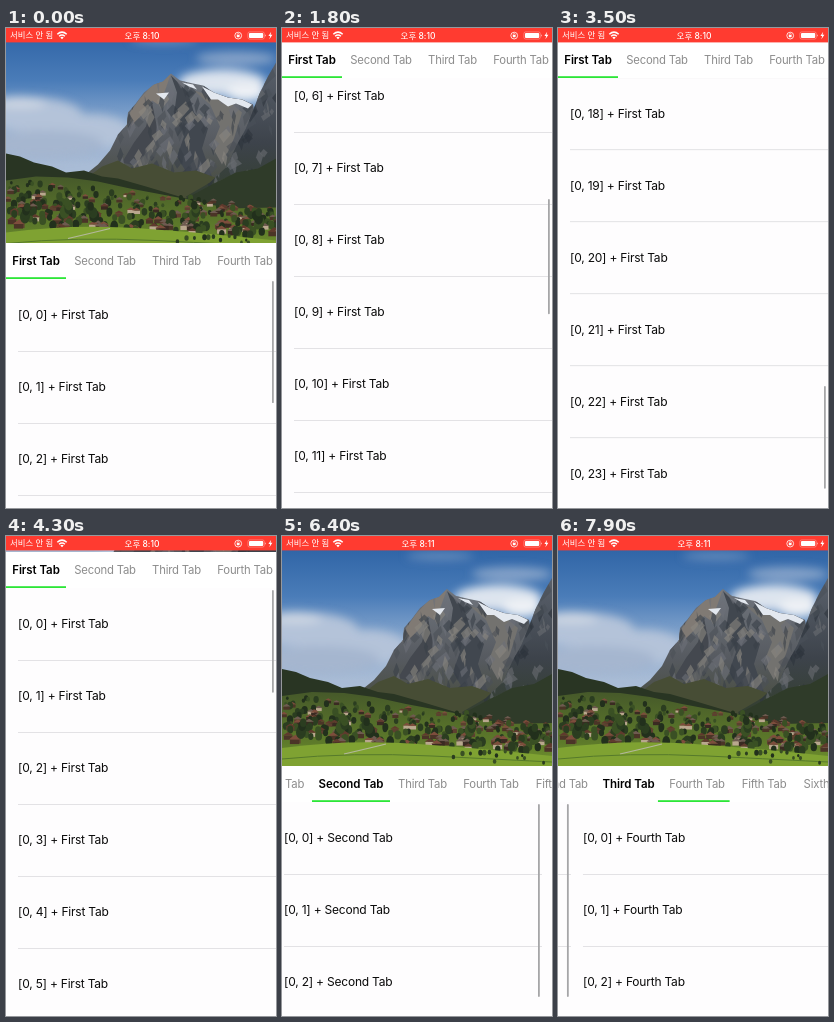
An HTML page for the animation above (8 s loop, 270 by 480 pixels).

```html
<!DOCTYPE html>
<html lang="ko">
<head>
<meta charset="utf-8">
<title>Sticky tabs</title>
<style>
html, body { margin: 0; width: 100%; height: 100%; overflow: hidden; background: #fff; }
svg { display: block; width: 270px; height: 480px; }
text { font-family: Inter, "Noto Sans CJK KR", "Noto Sans CJK", sans-serif; }
.row { font-size: 12px; letter-spacing: -.21px; fill: #0a0a0a; }
.tab { font-size: 11.3px; letter-spacing: -.2px; fill: #8c8c8c; text-anchor: middle; }
.tab.on { font-size: 11.5px; letter-spacing: -.07px; font-weight: 600; fill: #000; }
.status { fill: #fff; }
</style>
</head>
<body>
<svg viewBox="0 0 270 480">
  <defs>
    <linearGradient id="sky" x1="0" y1="0" x2="0" y2="1">
      <stop offset=".05" stop-color="#2f64a6"/>
      <stop offset=".25" stop-color="#4a7cb8"/>
      <stop offset=".42" stop-color="#86a6cd"/>
      <stop offset=".6" stop-color="#a9bcd6"/>
    </linearGradient>
    <linearGradient id="rock" x1="0" y1="0" x2="0" y2="1">
      <stop offset="0" stop-color="#70757d"/>
      <stop offset=".55" stop-color="#565a60"/>
      <stop offset="1" stop-color="#454a38"/>
    </linearGradient>
    <linearGradient id="slope" x1="0" y1="0" x2="0" y2="1">
      <stop offset="0" stop-color="#5a616c"/>
      <stop offset=".55" stop-color="#3d434b"/>
      <stop offset="1" stop-color="#323e2a"/>
    </linearGradient>
    <linearGradient id="grass" x1="0" y1="0" x2="0" y2="1">
      <stop offset="0" stop-color="#46592a"/>
      <stop offset=".6" stop-color="#5d7a2a"/>
      <stop offset="1" stop-color="#7b9e30"/>
    </linearGradient>
    <filter id="soft" x="-30%" y="-60%" width="160%" height="220%">
      <feGaussianBlur stdDeviation="5"/>
    </filter>
    <path id="peak" d="M72 160L92 144 104 130 112 114 121 104 122 92 129 84 138 72 148 64 157 61 165 53 174 60 187 63 197 65 208 72 222 77 236 79 247 84 262 180 72 180Z"/>
    <path id="cliff" d="M270 42L262 56 254 72 247 90 240 108 230 126 221 146 204 162 180 176 186 188 270 188Z"/>
    <clipPath id="peakClip"><use href="#peak"/></clipPath>
    <clipPath id="cliffClip"><use href="#cliff"/></clipPath>
    <clipPath id="window"><rect id="pane" y="14" width="270" height="216"/></clipPath>
  </defs>

  <rect width="270" height="480" fill="#fefdfe"/>
  <g id="pages"></g>

  <g clip-path="url(#window)">
    <g id="photo">
      <rect width="270" height="240" fill="url(#sky)"/>
      <g filter="url(#soft)" fill="#b4c3d9">
        <ellipse cx="24" cy="94" rx="52" ry="17"/>
        <ellipse cx="84" cy="112" rx="42" ry="18"/>
        <ellipse cx="36" cy="124" rx="62" ry="14" fill="#a5b6cf"/>
        <ellipse cx="14" cy="82" rx="26" ry="6" fill="#ccd5e2"/>
        <ellipse cx="158" cy="20" rx="34" ry="4" opacity=".4"/>
        <ellipse cx="216" cy="62" rx="44" ry="13" fill="#dde4ee"/>
        <ellipse cx="240" cy="72" rx="20" ry="9" fill="#eef1f5"/>
        <ellipse cx="230" cy="38" rx="40" ry="7" opacity=".6"/>
      </g>
      <use href="#peak" fill="url(#rock)"/>
      <g clip-path="url(#peakClip)">
        <path fill="#807a74" d="M165 53L157 60 146 65 134 78 124 92 125 106 138 92 146 80 152 84 159 70Z"/>
        <path fill="#41474f" d="M165 55L171 72 168 94 178 116 171 136 184 158 206 156 196 128 202 108 188 92 182 72Z"/>
        <path fill="#44484f" d="M146 82L140 106 128 122 116 142 132 146 144 124 152 112Z"/>
        <path fill="#73726f" d="M188 70L204 84 214 106 206 126 216 144 228 118 236 92 222 80Z"/>
        <g id="peakGrain"></g>
        <path fill="#e3e8ef" d="M196 66L208 72 222 77 236 79 246 84 242 88 230 83 222 86 212 79 205 79ZM176 62L187 64 191 69 183 66ZM150 73L163 72 158 79Z"/>
        <path fill="#474d35" d="M72 164L96 146 112 140 126 148 146 143 168 152 190 150 212 158 206 182 72 182Z"/>
      </g>
      <use href="#cliff" fill="url(#slope)"/>
      <g id="cliffGrain" clip-path="url(#cliffClip)"></g>
      <path fill="#2f3b29" d="M180 178L208 163 230 152 252 148 270 138V192H180Z"/>
      <path fill="#293523" d="M0 133L14 136 28 142 46 146 60 152 78 150 96 156 112 158 140 166 180 178 188 190 0 190Z"/>
      <path fill="url(#grass)" d="M0 160L30 156 62 157 92 161 124 168 156 174 188 180 222 188 270 187V240H0Z"/>
      <g id="village"></g>
      <path fill="#7fa232" d="M0 212Q60 204 118 207T270 220V240H0Z"/>
      <path fill="none" stroke="#b4b89c" stroke-width="1.2" d="M62 218Q88 212 104 208"/>
      <path fill="none" stroke="#567a2b" d="M0 223Q70 216 150 220T270 226"/>
      <g id="front"></g>
    </g>
  </g>

  <g id="bar">
    <rect width="270" height="36" fill="#fff"/>
    <g id="tabs"><rect id="mark" y="34.2" height="1.8" fill="#2ce637"/></g>
  </g>

  <g class="status">
    <rect width="270" height="14.4" fill="#ff3b30"/>
    <text x="4" y="10.4" font-size="8.4">서비스 안 됨</text>
    <g fill="none" stroke="#fff" stroke-width="1.5">
      <path d="M51.3 6.2Q56 2 60.7 6.2M53.1 8.2Q56 5.7 58.9 8.2"/>
    </g>
    <path d="M54.3 9.4Q56 8 57.7 9.4L56 11.2Z"/>
    <text id="clock" x="136" y="10.5" font-size="8.5" font-weight="500" text-anchor="middle"></text>
    <circle cx="232.2" cy="7.6" r="3.4" fill="none" stroke="#fff" stroke-width=".8"/>
    <rect x="230.8" y="7" width="2.8" height="2.2" rx=".4"/>
    <path fill="none" stroke="#fff" stroke-width=".6" d="M231.3 7.2V6.4a.9 .9 0 0 1 1.8 0V7.2"/>
    <rect x="241.9" y="3.9" width="16.4" height="7.2" rx="1.8" fill="none" stroke="#fff" stroke-width=".5" opacity=".6"/>
    <rect x="243" y="5" width="14.2" height="5" rx=".9"/>
    <path d="M259.1 6.2Q260.4 7.5 259.1 8.8Z"/>
    <path d="M265.2 3.8L262.4 8H264.2L263.4 11.2 266.4 6.8H264.5Z"/>
  </g>
</svg>
<script>
const LOOP = 8000, STEP = 100;
const ROW = 72, ROWS = 25, VIEW = 430, HEAD = 216, TOP = 14, TAB = 36;
const names = ["First", "Second", "Third", "Fourth", "Fifth", "Sixth"];
const edges = [0, 60, 138, 203, 275, 337, 402];

// [time, value] pairs: header collapse, list offset, page position
const collapse = [[0, 15], [200, 70], [500, 170], [700, 216], [4250, 216],
  [4300, 214], [4400, 90], [4500, 0]];
const listing = [[800, 0], [1100, 110], [1400, 330], [1900, 480], [2200, 640],
  [2700, 943], [3100, 1340], [3400, 1370], [3700, 1150], [4250, 0],
  [4450, 0], [4550, -15], [4700, -12], [5000, -1], [5200, 0]];
const paging = [[5300, 0], [5500, .35], [5700, .85], [5900, .98], [6000, 1],
  [6300, 1], [6400, 1.037], [6600, 1.25], [6900, 1.75], [7200, 1.97],
  [7500, 2], [7600, 2], [7700, 2.2], [7800, 2.7], [7900, 2.952]];

const $ = id => document.getElementById(id);
const mix = (a, b, k) => a + (b - a) * k;

function track(keys, t) {
  const i = keys.findIndex(k => k[0] > t);
  if (i < 0) return keys[keys.length - 1][1];
  if (i === 0) return keys[0][1];
  const [t0, a] = keys[i - 1], [t1, b] = keys[i];
  return mix(a, b, (t - t0) / (t1 - t0));
}

function add(parent, tag, attrs, text) {
  const node = document.createElementNS("http://www.w3.org/2000/svg", tag);
  set(node, attrs);
  if (text) node.textContent = text;
  return parent.appendChild(node);
}

function set(node, attrs) {
  for (const k in attrs) node.setAttribute(k, attrs[k]);
}

const move = (node, x, y) => set(node, { transform: `translate(${x} ${y})` });

let seed = 11;
function rnd(a, b) {
  seed = (seed * 16807) % 2147483647;
  return mix(a, b, seed / 2147483647);
}
const pick = list => list[Math.floor(rnd(0, list.length))];

// slanted slivers of light and shade on the rock
function grain(parent, x0, x1, y0, y1, lean, count, tones) {
  for (let i = 0; i < count; i++) {
    const x = rnd(x0, x1), y = rnd(y0, y1), h = rnd(6, 20), w = rnd(1.5, 5);
    const dx = h * lean * rnd(-.2, 1);
    add(parent, "path", { d: `M${x} ${y}l${w} ${h * .4}l${dx - w / 2} ${h * .6}l${-w} ${-h * .5}z`,
      fill: pick(tones), opacity: .6 });
  }
}

function tree(parent, x, y, h) {
  const fill = pick(["#22301c", "#2b3d20", "#3a5024"]);
  add(parent, "ellipse", { cx: x, cy: y - h / 2, rx: h * .38, ry: h / 2, fill });
}

function house(parent, x, y, w) {
  const h = w * .5;
  add(parent, "rect", { x, y: y - h, width: w, height: h, fill: pick(["#b9a78e", "#4b3427", "#5d4030", "#3a2a22"]) });
  add(parent, "path", { d: `M${x - 1} ${y - h}l${w / 2 + 1} ${-w * .4}l${w / 2 + 1} ${w * .4}z`,
    fill: pick(["#5f3a2d", "#7d4d3c", "#6e5a50"]) });
}

// the village, drawn from far to near
function buildVillage() {
  const village = $("village"), count = 330;
  for (let i = 0; i < count; i++) {
    const k = i / count, x = rnd(-4, 270);
    const y = mix(162 + x * .1, 208 + x * .045, k);
    if (i % 5 < 3) tree(village, x, y, rnd(3, 7) + k * 4);
    else house(village, x, y, rnd(4, 6) + k * 4);
  }
  for (const [x, y] of [[20, 203], [86, 202], [60, 198], [251, 208], [190, 201]]) {
    for (let i = 0; i < 4; i++) tree(village, x + rnd(-3, 3), y - i * 4, 13 - i * 1.5);
  }
  for (let i = 0; i < 14; i++) tree($("front"), rnd(170, 270), rnd(217, 229), rnd(3, 6));
}

function buildPage(n) {
  const group = add($("pages"), "g", {});
  const list = add(group, "g", {});
  for (let i = 0; i < (n ? 4 : ROWS); i++) {
    add(list, "text", { class: "row", x: 12, y: i * ROW + 40.3 }, `[0, ${i}] + ${names[n]} Tab`);
    add(list, "rect", { x: 12, y: (i + 1) * ROW, width: 258, height: .8, fill: "#dcdcdf" });
  }
  const thumb = add(group, "rect", { x: 266, y: 2, width: 1.8, height: 193, rx: .9, fill: "#a6a6a8" });
  return { group, list, thumb };
}

grain($("peakGrain"), 100, 250, 55, 155, -.5, 150, ["#8a8780", "#6d7178", "#3a4048", "#4c5158"]);
grain($("cliffGrain"), 205, 270, 45, 165, -.9, 70, ["#6a6d72", "#2e343c", "#4a5059"]);
buildVillage();
const pages = [0, 1, 2, 3].map(buildPage);
const labels = names.map((name, i) =>
  add($("tabs"), "text", { x: (edges[i] + edges[i + 1]) / 2, y: 22.3 }, name + " Tab"));

function drawThumb(offset, t) {
  // unseen rows count as shorter until they have been shown
  const seen = t < 3200 ? Math.min(ROWS, Math.round((offset + VIEW) / ROW)) : ROWS;
  const total = ROWS * ROW - 15 * (ROWS - seen);
  const height = VIEW * VIEW / total;
  const k = Math.max(0, Math.min(1, offset / (total - VIEW)));
  set(pages[0].thumb, { y: 2 + k * (VIEW - 4 - height), height });
}

function draw(t) {
  const up = track(collapse, t), offset = track(listing, t), page = track(paging, t);
  const top = TOP + HEAD - up;

  set($("pane"), { height: Math.max(0, HEAD - up) });
  move($("photo"), 0, -up / 2);
  move($("bar"), 0, top);

  pages.forEach((p, i) => move(p.group, (i - page) * 270, top + TAB));
  move(pages[0].list, 0, -offset);
  drawThumb(offset, t);

  const near = Math.round(page);
  const at = Math.abs(page - near) < .04 ? near : page;
  const on = Math.floor(at), k = at - on;
  const left = mix(edges[on], edges[on + 1], k);
  const right = mix(edges[on + 1], edges[on + 2], k);
  set($("mark"), { x: left, width: right - left });
  move($("tabs"), -left / 2, 0);
  labels.forEach((l, i) => set(l, { class: i === on ? "tab on" : "tab" }));

  $("clock").textContent = t < 5500 ? "오후 8:10" : "오후 8:11";
}

const start = performance.now();
function tick() {
  const t = (performance.now() - start) % LOOP;
  draw(Math.floor(t / STEP) * STEP);
  requestAnimationFrame(tick);
}
draw(0);
requestAnimationFrame(tick);
</script>
</body>
</html>
```
